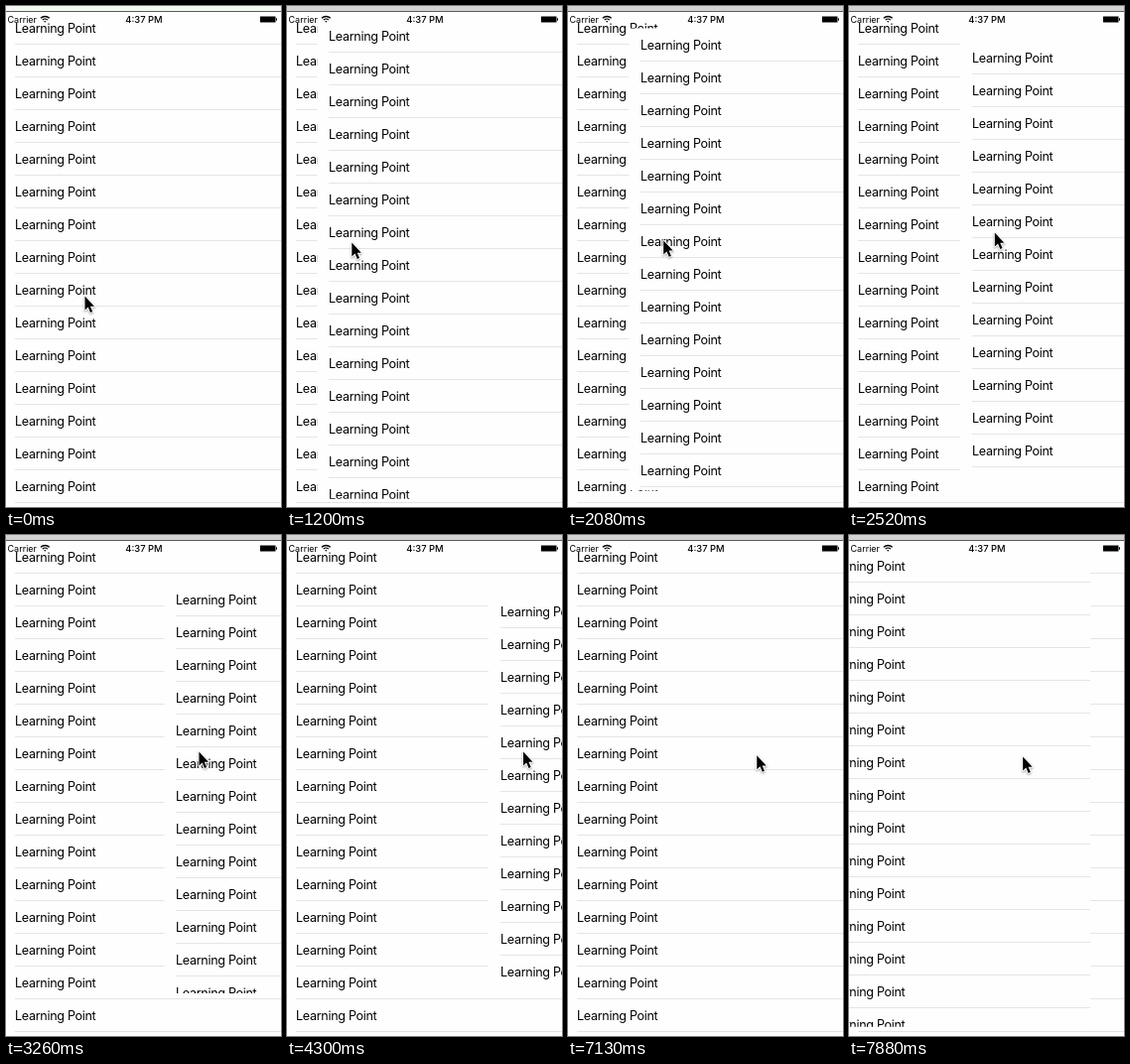
Animation, 277 px wide and 505 px high, one loop 8000 ms. Source, as an HTML page with a canvas:

```html
<!DOCTYPE html>
<html lang="en">
<head>
<meta charset="utf-8">
<title>Swipe card list</title>
<style>
  html, body { margin: 0; width: 100%; height: 100%; overflow: hidden; background: #fefefe; }
  canvas { display: block; width: 277px; height: 505px; }
</style>
</head>
<body>
<canvas id="stage"></canvas>
<script>
const WIDTH = 277, HEIGHT = 505, LOOP = 8000;
const TICK = 148.5, FIRST_TICK = 288;
const ROW = 33, SLOPE = 0.27;
const PAPER = '#fefefe';
const FONT = 'Inter, Roboto, sans-serif';

const canvas = document.getElementById('stage');
const ctx = canvas.getContext('2d');
const ratio = window.devicePixelRatio || 1;
canvas.width = WIDTH * ratio;
canvas.height = HEIGHT * ratio;

const linear = u => u;
const easeOut = u => 1 - (1 - u) ** 2;
const smooth = u => u * u * (3 - 2 * u);

// Progress from 0 to 1 between two ticks
const ramp = (tick, start, end, ease = linear) =>
  ease(Math.min(1, Math.max(0, (tick - start) / (end - start))));

const pullRight = tick =>
  45 * ramp(tick, 3, 10, easeOut) +
  86 * ramp(tick, 10, 17.2, smooth) +
  72 * ramp(tick, 18, 27, easeOut);

const pullLeft = tick => 34 * ramp(tick, 48, 51);

function cardOffset(tick) {
  if (tick < 37) return pullRight(tick);
  if (tick < 39) return 130 + 147 * (tick - 37);
  return -pullLeft(tick);
}

function pointerPosition(tick) {
  const approach = ramp(tick, -1, 1);
  const back = ramp(tick, 43, 47);
  return {
    x: Math.max(79 - 33 * approach, 34.5 + pullRight(tick))
      - 131 * ramp(tick, 40, 42) + 111 * back - 1.26 * pullLeft(tick),
    y: 292.5 - 54 * approach - 20 * ramp(tick, 10, 20, smooth) + 5 * back
  };
}

function rect(color, x, y, w, h) {
  ctx.fillStyle = color;
  ctx.fillRect(x, y, w, h);
}

function label(text, x, y, font, spacing = 0, align = 'left') {
  ctx.font = `${font} ${FONT}`;
  ctx.letterSpacing = spacing + 'px';
  ctx.textAlign = align;
  ctx.fillStyle = '#000';
  ctx.fillText(text, x, y);
}

function drawRows(x, right, baseline) {
  for (let y = baseline; y < HEIGHT + ROW; y += ROW) {
    label('Learning Point', x, y, '12.56px', -0.3);
    rect('#e5e5e7', x, y + 11, right - x, 1);
  }
}

function drawCard(offset) {
  const shift = Math.abs(offset) * SLOPE;
  const top = 5.8 + shift, bottom = HEIGHT - shift;
  ctx.save();
  ctx.beginPath();
  ctx.rect(offset, top, WIDTH, bottom - top);
  ctx.clip();
  rect(PAPER, offset, top, WIDTH, bottom - top);
  drawRows(Math.round(offset + (offset > 0 ? 12 : 9)), offset + WIDTH, Math.round(27.2 + shift));
  ctx.restore();
}

function drawStatusBar(focused) {
  rect(focused ? '#d3d3d3' : '#f3f8f2', 0, 0, WIDTH, 5);
  rect('#5c5c5c', 0, 5, WIDTH, 1);

  label('Carrier', 1.5, 17, '9px');
  label('4:37 PM', 139, 17, '500 9.4px', 0, 'center');

  ctx.strokeStyle = '#000';
  ctx.lineWidth = 1.3;
  for (const radius of [1, 3.6, 6.2]) {
    ctx.beginPath();
    ctx.arc(39.3, 16.7, radius, -Math.PI * 0.75, -Math.PI * 0.25);
    ctx.stroke();
  }

  rect('#000', 256, 10.5, 15.5, 6);
  rect('#000', 272, 12.3, 1, 2.4);
}

const arrow = new Path2D('M.5 0V14L3.7 11L6 16.4L8.2 15.5L5.9 10.2H10Z');

function drawPointer({ x, y }) {
  ctx.save();
  ctx.translate(x, y);
  ctx.lineJoin = 'round';
  ctx.lineWidth = 2;
  ctx.strokeStyle = '#fff';
  ctx.shadowColor = 'rgba(0,0,0,.35)';
  ctx.shadowBlur = 2 * ratio;
  ctx.shadowOffsetY = ratio;
  ctx.stroke(arrow);
  ctx.shadowColor = 'transparent';
  ctx.fillStyle = '#000';
  ctx.fill(arrow);
  ctx.restore();
}

function draw() {
  const tick = Math.floor((performance.now() % LOOP - FIRST_TICK) / TICK);
  const offset = cardOffset(tick);
  ctx.setTransform(ratio, 0, 0, ratio, 0, 0);
  rect(PAPER, 0, 0, WIDTH, HEIGHT);
  drawRows(9, WIDTH, 27);
  if (offset) drawCard(offset);
  drawStatusBar(tick >= 3);
  drawPointer(pointerPosition(tick));
  requestAnimationFrame(draw);
}

draw();
</script>
</body>
</html>
```
